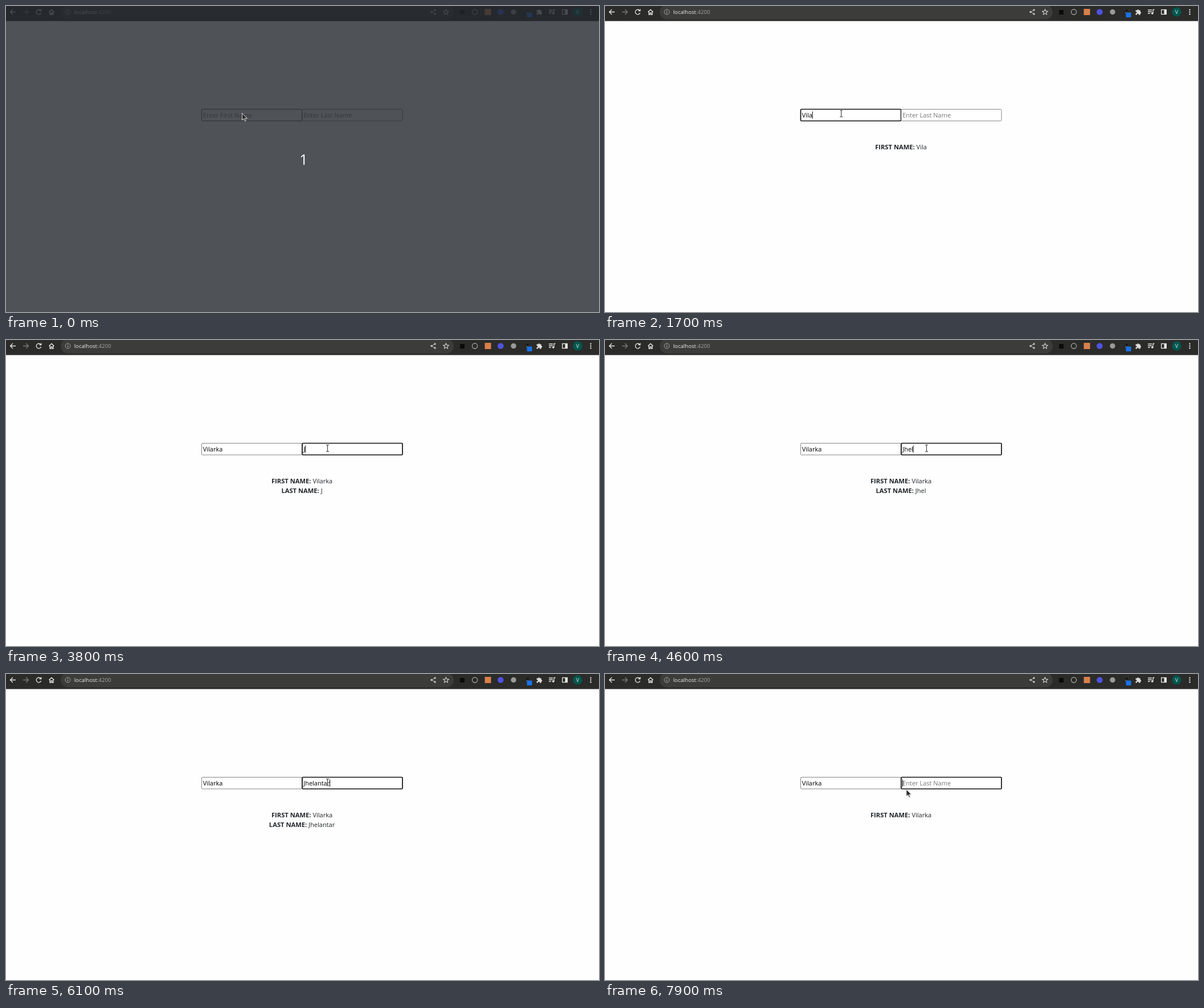
Animation of 1041 by 538 pixels, one loop 8000 ms. Source, as an HTML page:

```html
<!DOCTYPE html>
<html lang="en">
<head>
<meta charset="utf-8">
<title>Name form</title>
<style>
  html, body { margin: 0; width: 100%; height: 100%; overflow: hidden; background: #fefefe; }
  svg { display: block; width: 100%; height: 100%; }
  text { font-family: "Open Sans", "Noto Sans", sans-serif; font-size: 11px; white-space: pre; }
  .line { fill: none; stroke: #e8e8e8; stroke-width: 1.3; }
  .label { font-weight: 700; font-size: 11.2px; }
</style>
</head>
<body>
<svg viewBox="0 0 1041 538">
  <rect width="1041" height="538" fill="#fefefe"/>

  <g id="toolbar">
    <rect width="1041" height="26.5" fill="#2b2b2a"/>
    <rect x="96" y="-2" width="690" height="25.5" rx="12.7" fill="#3c3c3b"/>
    <path class="line" d="M17 10.5H8M12 6l-4.5 4.5L12 15"/>
    <path class="line" d="M30 10.5h9M35 6l4.500 4.500L35 15" style="stroke:#7b7b7a"/>
    <path class="line" d="M61 8A4.300 4.300 0 1 0 61.600 12M61.800 5.500V8.700H58.500"/>
    <path class="line" d="M75.500 10.500L80 6.300l4.500 4.200M77 9.500V15h2V11.800h2V15h2V9.500"/>
    <circle class="line" cx="108.500" cy="10.500" r="4.500" style="stroke:#a9a9a8;stroke-width:1"/>
    <path class="line" d="M108.500 10v3M108.500 7.700v1.200" style="stroke:#a9a9a8"/>
    <text x="119.700" y="14.200" style="font-size:9.650px" fill="#ededed">localhost<tspan fill="#a5a5a4">:4200</tspan></text>
    <path class="line" d="M753 7L747 10.500L753 14" style="stroke:#c4c4c4;stroke-width:1"/>
    <g fill="#c4c4c4"><circle cx="753" cy="7" r="1.700"/><circle cx="747" cy="10.500" r="1.700"/><circle cx="753" cy="14" r="1.700"/></g>
    <path class="line" id="star" style="stroke:#d0d0d0;stroke-width:1.100"/>
    <rect x="797" y="7" width="8" height="8" fill="#0b0b0b"/>
    <circle class="line" cx="823" cy="10.500" r="4.600" style="stroke:#b4b4b4;stroke-width:1.100"/>
    <rect x="840.500" y="5" width="11" height="11" fill="#d9804a"/>
    <circle cx="868.300" cy="10.500" r="5.300" fill="#4f52e0"/>
    <circle cx="891" cy="10.500" r="4.700" fill="#9a9a99"/>
    <path d="M911 14L917 7" stroke="#0b0b0b" stroke-width="2"/>
    <path d="M912 13.500L915 10" stroke="#86b886"/>
    <rect x="914.500" y="11.500" width="9" height="8.500" rx="1" fill="#1a73e8"/>
    <path fill="#dedede" d="M931.500 7.500h2.700a1.500 1.500 0 1 1 3 0h2.500v2.700a1.500 1.500 0 1 1 0 3v2.300h-3a1.400 1.400 0 1 0-2.600 0h-2.600v-2.700a1.400 1.400 0 1 0 0-2.600z"/>
    <path class="line" d="M953 7h7M953 10h7M953 13h4M962 13V6.500h2.500"/>
    <circle cx="960.700" cy="13" r="1.800" fill="#e8e8e8"/>
    <rect class="line" x="976.700" y="6.500" width="8.600" height="8"/>
    <rect x="981.500" y="6.500" width="4" height="8" fill="#e8e8e8"/>
    <circle cx="1003.500" cy="10.500" r="8.300" fill="#00564d"/>
    <text x="1003.500" y="13.700" text-anchor="middle" style="font-size:9px" fill="#e6efee">V</text>
    <g fill="#e8e8e8"><circle cx="1026.500" cy="6.700" r="1.200"/><circle cx="1026.500" cy="10.500" r="1.200"/><circle cx="1026.500" cy="14.300" r="1.200"/></g>
  </g>

  <g id="form"></g>

  <g id="countdown">
    <rect width="1041" height="538" fill="#24282f" opacity=".8"/>
    <text x="515.200" y="278.600" fill="#fff" style="font-size:25.500px;font-weight:500">1</text>
  </g>

  <path id="arrow" d="M0 0V12L2.900 9.500L4.900 14L6.800 13.200L4.900 8.900H8.800Z" fill="#2b2b2b" stroke="#e8e8e8" stroke-width=".9"/>
  <g id="beam" fill="none">
    <path d="M-2.500-6Q0-6 0-4.500Q0-6 2.500-6M0-4.500V4.500M-2.500 6Q0 6 0 4.500Q0 6 2.500 6" stroke="#fff" stroke-width="2.400" opacity=".8"/>
    <path d="M-2.500-6Q0-6 0-4.500Q0-6 2.500-6M0-4.500V4.500M-2.500 6Q0 6 0 4.500Q0 6 2.500 6" stroke="#3a3a3a" stroke-width="1.100"/>
  </g>
</svg>
<script>
const LOOP = 8000, STEP = 100;
const byId = id => document.getElementById(id);

function add(parent, tag, attrs) {
  const node = document.createElementNS("http://www.w3.org/2000/svg", tag);
  for (const key in attrs) node.setAttribute(key, attrs[key]);
  return parent.appendChild(node);
}

function show(node, on) {
  node.style.display = on ? "" : "none";
}

// Value of the last [time, ...value] entry that has been reached.
function latest(track, t) {
  return track.reduce((found, entry) => entry[0] <= t ? entry : found, track[0]);
}

const typed = times => [[0, 0], ...times.map((time, i) => [time, i + 1])];

const fields = [
  {
    x: 343.5, y: 251.8, name: "Vilarka", caption: "FIRST NAME:", hint: "Enter First Name",
    focus: [500, 3300],
    keys: typed([1300, 1500, 1600, 1700, 1800, 2000, 2100])
  },
  {
    x: 520, y: 268.8, name: "Jhelantara", caption: "LAST NAME:", hint: "Enter Last Name",
    focus: [3300, LOOP],
    keys: [
      ...typed([3800, 4100, 4300, 4600, 4700, 4800, 5000, 5100, 5200, 5300]),
      [6100, 9], [6500, 7], [6600, 5], [6700, 3], [6800, 1], [6900, 0]
    ]
  }
];
const blinks = [[1100, 1300], [5900, 6100], [7100, 7700]];
const within = ([from, to], t) => t >= from && t < to;

const pointer = [
  [0, "arrow", 414.5, 188.5], [100, "beam", 414.7, 189], [2700, "beam", 415.6, 189.3],
  [2800, "arrow", 437, 207], [2900, "arrow", 476, 237], [3000, "arrow", 520, 222],
  [3100, "beam", 553, 192], [3200, "beam", 562, 185.5], [3300, "beam", 564.5, 190.3],
  [7700, "beam", 558, 193], [7800, "arrow", 541, 202], [7900, "arrow", 529, 203]
];

for (const field of fields) {
  const form = byId("form");
  field.box = add(form, "rect", { x: field.x, y: 181.5, width: 176, height: 20.5, rx: 1.5, fill: "#fff" });
  field.input = add(form, "text", { x: field.x + 2.2, y: 195.7 });
  field.caret = add(form, "rect", { y: 185.5, width: 1, height: 12.5 });
  field.result = add(form, "text", { x: 519.5, y: field.y, "text-anchor": "middle", fill: "#212529" });
  add(field.result, "tspan", { class: "label" }).textContent = field.caption;
  field.echo = add(field.result, "tspan", {});
}

const starPoints = Array.from({ length: 10 }, (_, i) => {
  const r = i % 2 ? 2.3 : 5, a = i * Math.PI / 5;
  return [772.5 + r * Math.sin(a), 10.8 - r * Math.cos(a)].map(v => v.toFixed(1)).join(" ");
});
byId("star").setAttribute("d", "M" + starPoints.join("L") + "Z");

function drawField(field, t) {
  const value = field.name.slice(0, latest(field.keys, t)[1]);
  const focused = within(field.focus, t);
  const hovered = field === fields[0] && t < 500;
  field.input.textContent = value || field.hint;
  field.input.setAttribute("fill", value ? "#000" : "#757575");
  field.box.setAttribute("stroke", focused ? "#101010" : hovered ? "#444" : "#858585");
  field.box.setAttribute("stroke-width", focused ? 1.7 : 1);
  field.echo.textContent = " " + value;
  show(field.result, value);
  show(field.caret, focused && !blinks.some(span => within(span, t)));
  const advance = value ? field.input.getComputedTextLength() : 0;
  field.caret.setAttribute("x", field.x + 2 + advance);
}

function draw(t) {
  fields.forEach(field => drawField(field, t));
  show(byId("countdown"), t < 100);
  const [, shape, x, y] = latest(pointer, t);
  for (const id of ["arrow", "beam"]) {
    show(byId(id), id === shape);
    byId(id).setAttribute("transform", `translate(${x} ${y})`);
  }
}

const start = performance.now();
function tick() {
  const t = (performance.now() - start) % LOOP;
  draw(Math.floor(t / STEP) * STEP);
  requestAnimationFrame(tick);
}
tick();
</script>
</body>
</html>
```
